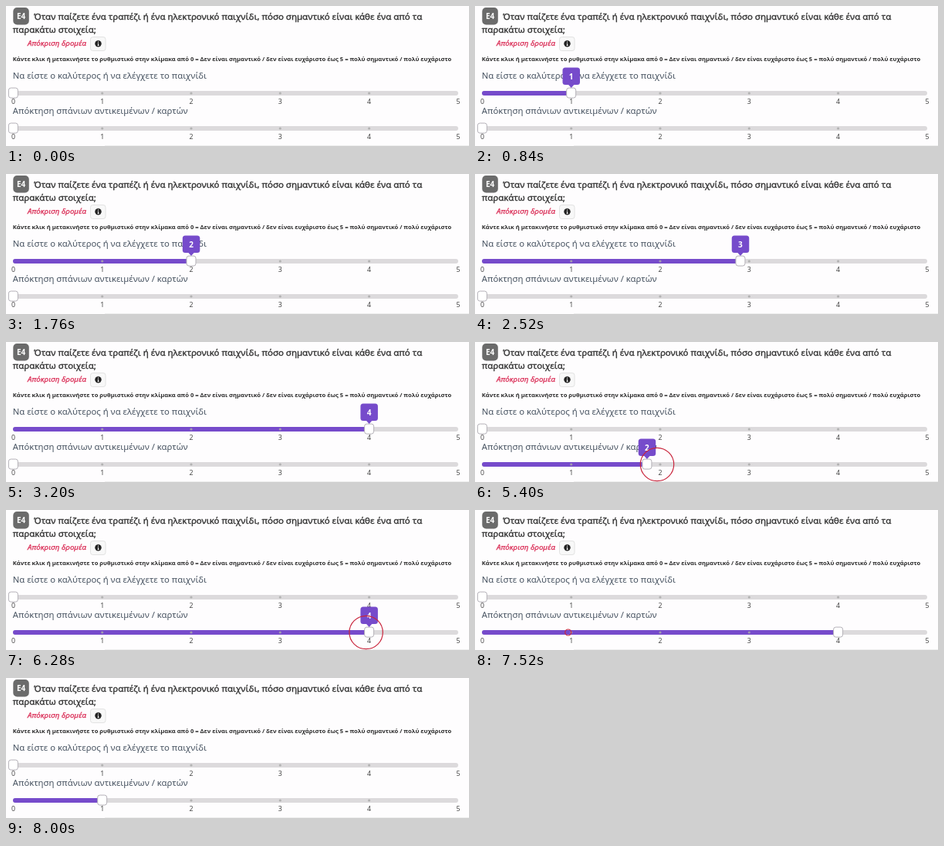
Write an HTML page that moves like this. It is 600 px wide and 183 px high and loops after 8.08 s.

```html
<!DOCTYPE html>
<html lang="el">
<head>
<meta charset="utf-8">
<style>
  html, body { margin: 0; width: 100%; height: 100%; overflow: hidden; background: #fefdfe; }
  svg { display: block; width: 600px; height: 183px; font-family: "Noto Sans", "Open Sans", sans-serif; }
  /* A thin outline gives the weight between regular and bold. */
  .title { font-size: 11.45px; fill: #333; stroke: #333; stroke-width: .35px; }
  .kind { font-size: 9.7px; font-style: italic; fill: #d8234e; stroke: #d8234e; stroke-width: .25px; }
  .hint { font-size: 7.62px; font-weight: 700; fill: #2b2b2b; }
  .label { font-size: 11.25px; fill: #465260; }
  .num { font-size: 8.8px; fill: #484848; text-anchor: middle; }
  .white { font-size: 10px; font-weight: 600; fill: #fff; text-anchor: middle; }
</style>
</head>
<body>
<svg viewBox="0 0 600 183">
  <rect x="9.3" y="2" width="20.5" height="22.5" rx="5" fill="#6b6b6b"/>
  <text class="white" x="19.6" y="17.3" style="font-weight:700">E4</text>
  <text class="title" x="36.2" y="17.5">Όταν παίζετε ένα τραπέζι ή ένα ηλεκτρονικό παιχνίδι, πόσο σημαντικό είναι κάθε ένα από τα</text>
  <text class="title" x="8.8" y="34.7">παρακάτω στοιχεία;</text>
  <text class="kind" x="28" y="52.3">Απόκριση δρομέα</text>
  <rect x="109.5" y="40.5" width="19.5" height="18" rx="3" fill="#f8f8f8" stroke="#e2e2e2"/>
  <circle cx="119.5" cy="49.3" r="4.2" fill="#222"/>
  <path d="M119.5 46.4v1.3M118.8 49h.8v2.6m-1 0h2" stroke="#fff" fill="none"/>
  <text class="hint" x="8.8" y="72.3">Κάντε κλικ ή μετακινήστε το ρυθμιστικό στην κλίμακα από 0 = Δεν είναι σημαντικό / δεν είναι ευχάριστο έως 5 = πολύ σημαντικό / πολύ ευχάριστο</text>
  <path d="M128 182.5H600" stroke="#efefef"/>
  <g id="sliders"></g>
  <circle id="ring" fill="none" stroke="#c9253c" stroke-width="1.2"/>
</svg>
<script>
const LOOP = 8080, FRAME = 40, PURPLE = '#764bcb';
const xOf = value => 9.4 + value * 115.3;

// Each key is [time, value]; each tip is a [from, to] span.
const sliders = [
  {
    y: 114, label: 'Να είστε ο καλύτερος ή να ελέγχετε το παιχνίδι',
    keys: [[80, 0], [800, 1], [1000, 1], [1680, 2], [2360, 2], [2800, 5], [2920, 5], [3160, 4], [3260, 4], [3800, 0]],
    tips: [[40, 3920]]
  },
  {
    y: 160, label: 'Απόκτηση σπάνιων αντικειμένων / καρτών',
    keys: [[5000, 0], [5480, 2], [5840, 2], [6260, 4], [7520, 4], [7960, 1]],
    tips: [[5040, 5480], [5880, 6360], [7560, 7960]]
  }
];
const clicks = [[5000, 2], [5840, 4], [7520, 1]];
const ring = document.getElementById('ring');

function build({ y, label }) {
  const ticks = [0, 1, 2, 3, 4, 5].map(v =>
    `<text class="num" x="${xOf(v)}" y="${y + 13.9}">${v}</text>` +
    (v % 5 ? `<circle cx="${xOf(v)}" cy="${y}" r="1.6" fill="#aaa" fill-opacity=".85"/>` : '')).join('');
  return `<g><text class="label" x="8.8" y="${y - 18.7}">${label}</text>
    <rect x="9" y="${y - 3}" width="577" height="6" rx="3" fill="#dcdadc"/>
    <rect class="fill" x="9" y="${y - 3}" height="6" rx="3" fill="${PURPLE}"/>${ticks}
    <g class="knob">
      <rect x="-6" y="${y - 6.9}" width="12" height="13" rx="3" fill="#fff" stroke="#b4b1b8"/>
      <g class="tip">
        <path d="M-4 ${y - 11.5}h8l-4 4.5z" fill="${PURPLE}"/>
        <rect x="-11.2" y="${y - 33.5}" width="22.5" height="22.5" rx="3.5" fill="${PURPLE}"/>
        <text class="white" y="${y - 18}"></text>
      </g>
    </g></g>`;
}

function valueAt(keys, t) {
  const next = keys.findIndex(key => key[0] > t);
  if (next === 0) return keys[0][1];
  if (next < 0) return keys[keys.length - 1][1];
  const [t0, a] = keys[next - 1], [t1, b] = keys[next];
  const p = (t - t0) / (t1 - t0);
  return a + (b - a) * p * p * (3 - 2 * p);
}

const show = (el, on) => el.setAttribute('visibility', on ? 'visible' : 'hidden');

function draw(now) {
  const t = Math.floor(now % LOOP / FRAME) * FRAME;
  for (const { keys, tips, node } of sliders) {
    const value = valueAt(keys, t), x = xOf(value);
    node.querySelector('.fill').setAttribute('width', value ? x - 9 : 0);
    node.querySelector('.knob').setAttribute('transform', `translate(${x} 0)`);
    node.querySelector('.tip text').textContent = Math.round(value);
    show(node.querySelector('.tip'), tips.some(([from, to]) => t >= from && t < to));
  }
  const click = clicks.find(([start]) => t >= start && t < start + 480);
  show(ring, click);
  if (click) {
    ring.setAttribute('cx', xOf(click[1]) - 4);
    ring.setAttribute('cy', 160);
    ring.setAttribute('r', 4 + 17.7 * Math.min(1, (t - click[0]) / 400));
  }
}

const host = document.getElementById('sliders');
host.innerHTML = sliders.map(build).join('');
sliders.forEach((slider, i) => slider.node = host.children[i]);

const begin = performance.now();
function tick() {
  draw(performance.now() - begin);
  requestAnimationFrame(tick);
}
tick();
</script>
</body>
</html>
```
